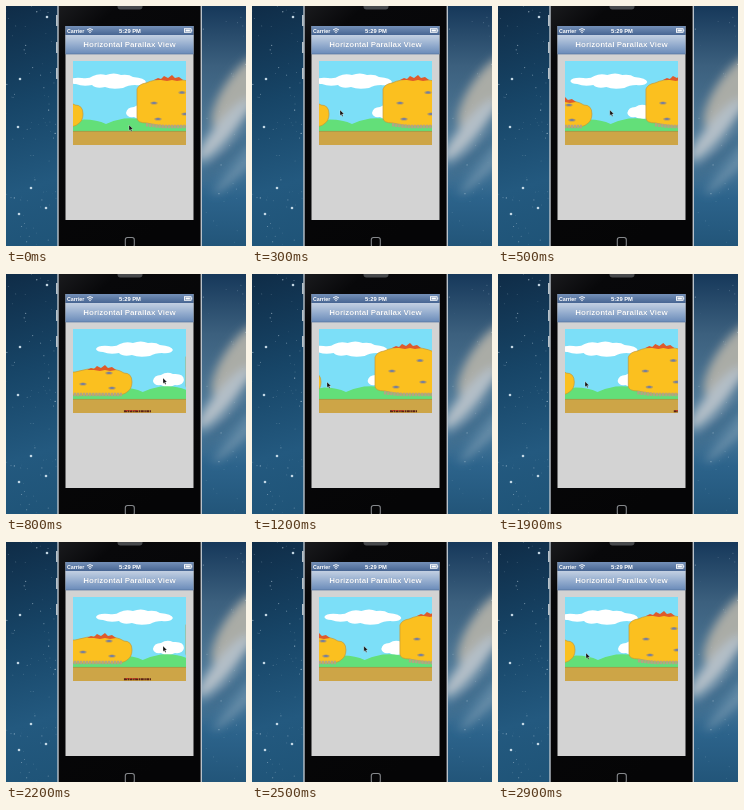
Animation, 240 px wide and 240 px high, one loop 3 s. Source, as an HTML page:

```html
<!DOCTYPE html>
<html lang="en">
<head>
<meta charset="utf-8">
<title>Horizontal Parallax View</title>
<style>
html, body { margin: 0; width: 100%; height: 100%; overflow: hidden; background: #174567; }
svg { display: block; width: 100vw; height: 100vh; }
text { font-family: "Liberation Sans", Arial, sans-serif; font-weight: bold; fill: #fff; }
</style>
</head>
<body>
<svg viewBox="0 0 240 240">
  <defs>
    <linearGradient id="night" gradientUnits="userSpaceOnUse" x1="0" y1="0" x2="70" y2="230">
      <stop offset="0" stop-color="#0f2c47"/>
      <stop offset=".4" stop-color="#174567"/>
      <stop offset=".75" stop-color="#23597f"/>
      <stop offset="1" stop-color="#1f5478"/>
    </linearGradient>
    <linearGradient id="space" x2="0" y2="1">
      <stop offset="0" stop-color="#16385a"/>
      <stop offset=".25" stop-color="#3c607e"/>
      <stop offset=".6" stop-color="#54809f"/>
      <stop offset=".8" stop-color="#2c638b"/>
      <stop offset="1" stop-color="#225579"/>
    </linearGradient>
    <linearGradient id="status" x2="0" y2="1">
      <stop offset="0" stop-color="#7490b8"/>
      <stop offset="1" stop-color="#476592"/>
    </linearGradient>
    <linearGradient id="nav" x2="0" y2="1">
      <stop offset="0" stop-color="#c3d0e2"/>
      <stop offset=".5" stop-color="#96aecf"/>
      <stop offset="1" stop-color="#6a8bb9"/>
    </linearGradient>
    <linearGradient id="bezel" x2=".5" y2="1">
      <stop offset="0" stop-color="#1d1e21"/>
      <stop offset=".2" stop-color="#08080a"/>
      <stop offset="1" stop-color="#050506"/>
    </linearGradient>
    <filter id="soft" x="-50%" y="-50%" width="200%" height="200%"><feGaussianBlur stdDeviation="5"/></filter>
    <clipPath id="view"><rect x="67" y="55" width="113" height="84"/></clipPath>
    <clipPath id="side"><rect x="195" width="45" height="240"/></clipPath>
  </defs>

  <rect width="240" height="240" fill="url(#night)"/>
  <g clip-path="url(#side)">
    <rect x="195" width="45" height="240" fill="url(#space)"/>
    <g filter="url(#soft)">
      <ellipse cx="236" cy="86" rx="18" ry="46" fill="#aaaca6" transform="rotate(35 236 86)"/>
      <ellipse cx="218" cy="124" rx="9" ry="40" fill="#b4bfc8" transform="rotate(40 218 124)"/>
      <ellipse cx="222" cy="150" rx="5" ry="38" fill="#3f6c8c" transform="rotate(48 222 150)"/>
      <ellipse cx="236" cy="160" rx="4" ry="40" fill="#6f93ac" transform="rotate(45 236 160)"/>
    </g>
  </g>
  <g id="stars" fill="#d5e7f2"></g>

  <rect x="52" y="-10" width="143.500" height="260" fill="url(#bezel)"/>
  <path d="M52 0V240M195.300 0V240" stroke="#b9c2ca" stroke-width="1.400"/>
  <path d="M50.800 9V20M50.800 36V47M50.800 62V73" stroke="#c8d0d6" stroke-width="1.400"/>
  <rect x="111.500" y="-3" width="25" height="6.500" rx="3" fill="#47494c"/>
  <rect x="119.300" y="231.500" width="9" height="9.500" rx="2.200" fill="none" stroke="#85888b" stroke-width="1.100"/>

  <rect x="59.500" y="20" width="128" height="194" fill="#d3d3d3"/>
  <rect x="59.500" y="20" width="128" height="9" fill="url(#status)"/>
  <rect x="59.500" y="29" width="128" height="19" fill="url(#nav)"/>
  <path d="M59.500 48H187.500" stroke="#56749f" stroke-width=".7"/>
  <text x="61" y="26.700" font-size="5.300">Carrier</text>
  <text x="124" y="27" font-size="5.800" text-anchor="middle">5:29 PM</text>
  <g fill="none" stroke="#fff" stroke-width=".9">
    <path d="M81 23.900Q84 21.300 87 23.900M82.300 25.300Q84 23.800 85.700 25.300"/>
    <rect x="178.500" y="22.700" width="6.500" height="3.600"/>
  </g>
  <circle cx="84" cy="26.500" r=".7" fill="#fff"/>
  <path d="M179.500 23.600h4.400v1.800h-4.400zM185.300 23.600h.9v1.800h-.9z" fill="#fff"/>
  <text x="123.500" y="40.800" font-size="8" text-anchor="middle" style="fill:#58749d">Horizontal Parallax View</text>
  <text x="123.500" y="41.400" font-size="8" text-anchor="middle">Horizontal Parallax View</text>

  <g clip-path="url(#view)">
    <rect x="67" y="55" width="113" height="84" fill="#7cdff8"/>
    <g id="clouds" fill="#fff">
      <path d="M63 75Q65 71 76 72Q83 73 87 70Q93 67 100 69Q108 66 115 69Q123 68 127 71Q139 72 140 76Q138 80 129 79Q122 79 117 82Q106 84 99 81Q90 83 86 79Q77 81 70 78Q64 78 63 75Z"/>
      <path d="M120 107Q121 101 128 101Q134 97 140 100Q151 99 151 106Q150 112 142 111Q134 115 128 111Q121 112 120 107Z"/>
    </g>
    <path id="meadow" fill="#63df79" d="M-20 140V119Q10 109 35 117Q58 117 78 113.500Q91 113.500 100 118Q109 114 118 112.500Q133 111 144 116Q170 119 220 113V140Z"/>
    <g id="hills"></g>
    <rect x="67" y="125" width="113" height="14" fill="#cda547"/>
    <path d="M67 125.400H180" stroke="#9d9a46" stroke-width=".8"/>
    <g id="twigs">
      <path d="M0 137.300H27" stroke="#5a2014" stroke-width="2" stroke-dasharray="3 .6 1.500 .5"/>
      <path d="M2 136.500H14" stroke="#c23020" stroke-dasharray="2 1.500"/>
    </g>
  </g>
  <path id="cursor" d="M0 0V5.500L1.300 4.400L2.200 6.400L3.100 6L2.300 4.100L4 4Z" fill="#111" stroke="#fff" stroke-width=".3"/>
</svg>
<script>
const $ = id => document.getElementById(id);
const HALF = 1500, STEP = 100;

// time, cursor x, cursor y; the drag starts once the cursor rests at GRAB
const GRAB = 88;
const keys = [
  [0, 123, 119], [100, 88, 111], [300, 88, 104], [800, 157, 104],
  [1200, 75, 108], [1400, 54, 112], [1600, 54, 112]
];

function scatter() {
  let seed = 11, out = '';
  const rnd = () => (seed = seed * 16807 % 2147483647) / 2147483647;
  const star = (x, y, r, o) => out += `<circle cx="${x}" cy="${y}" r="${r}" opacity="${o}"/>`;
  for (let i = 0; i < 75; i++) star(rnd() * 50, rnd() * 240, .25 + rnd() * .4, .2 + rnd() * .5);
  for (let i = 0; i < 30; i++) star(197 + rnd() * 43, rnd() * 240, .25 + rnd() * .35, .2 + rnd() * .4);
  [[14, 73], [12, 121], [40, 202], [41, 11], [25, 182], [13, 208]].forEach(([x, y]) => star(x, y, 1.3, .9));
  $('stars').innerHTML = out;
}

function hill(body, peak, top, spots, grass) {
  const marks = spots.map(([x, y]) =>
    `<ellipse cx="${x}" cy="${y}" rx="3.600" ry="1.500" fill="#b39a63"/><ellipse cx="${x}" cy="${y}" rx="2" ry=".9" fill="#747fa0"/>`).join('');
  return `<path d="${body}" fill="#fbc01f" stroke="#c29a3c" stroke-width=".7"/>
    <path d="M${peak - 14} ${top + 2}l4-2 3 1 3-3 4 2 4-3 3 3 4-1 4 3-6 1-5-1-5 1-6-1z" fill="#df5a2b"/>${marks}
    <path d="${grass}" stroke="#b3a583" stroke-width="3.500" stroke-dasharray="2.500 .6" fill="none"/>`;
}

function buildHills() {
  $('hills').innerHTML =
    hill('M131 83Q133 78 140 77Q148 73 163 73Q180 73 190 78Q199 80 200 88V120H158Q148 119 141 117Q131 117 131 112Z',
      162, 72, [[148, 97], [176, 86.5], [179, 108], [152, 113]], 'M140 118.500Q150 120 160 120.500H200') +
    hill('M3 106Q6 97 20 98Q32 94 46 94.500Q62 94 69 99Q77 99 77 108Q77 115 72 118Q69 121 60 121H3Z',
      46, 94, [[28, 110], [54, 99], [57, 114]], 'M3 120.500H67');
}

function pose(t) {
  let i = 0;
  while (t >= keys[i + 1][0]) i++;
  const [t0, x0, y0] = keys[i], [t1, x1, y1] = keys[i + 1];
  const k = (1 - Math.cos(Math.PI * (t - t0) / (t1 - t0))) / 2;
  return [x0 + (x1 - x0) * k, y0 + (y1 - y0) * k];
}

const move = (id, x, y = 0) => $(id).setAttribute('transform', `translate(${x.toFixed(2)} ${y.toFixed(2)})`);

function draw(ms) {
  // plays forward, then backward
  const step = Math.floor(ms % (2 * HALF) / STEP) * STEP;
  const t = HALF - Math.abs(HALF - step);
  const [x, y] = pose(t);
  const pan = t < 300 ? 0 : Math.max(-8, (x - GRAB) * .71);
  const twigPan = Math.max(-7, pan);
  move('cursor', x, y);
  move('clouds', pan * .55);
  move('meadow', pan * .75);
  move('hills', pan);
  move('twigs', (180 + twigPan * 6) % 356);
}

scatter();
buildHills();
draw(0);
const start = performance.now();
requestAnimationFrame(function tick() {
  draw(performance.now() - start);
  requestAnimationFrame(tick);
});
</script>
</body>
</html>
```
